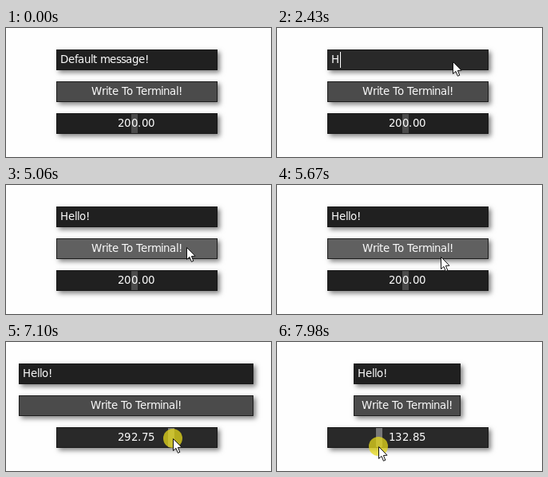
Write an HTML page with a canvas that moves like this. It is 332 px wide and 162 px high and loops after 8000 ms.

```html
<!DOCTYPE html>
<html lang="en">
<head>
<meta charset="utf-8">
<title>Widgets</title>
<style>
html, body { margin: 0; width: 332px; height: 162px; overflow: hidden; background: #fefefe; }
canvas { display: block; }
</style>
</head>
<body>
<canvas id="stage" width="332" height="162"></canvas>
<script>
const ctx = document.getElementById('stage').getContext('2d');
const LOOP = 8000;
const SIZE = 13.33;
const FAMILY = '"DejaVu Sans", sans-serif';

// Pointer moves: start, end, steps, x, y, slider value, ease
const linear = p => p;
const easeOut = p => 1 - (1 - p) ** 2.3;
const easeIn = p => p ** 1.3;
const smooth = p => p * p * (3 - 2 * p);
const start = { x: 306, y: 50, value: 200 };
const moves = [
  [330, 540, 4, 220, 42, 200, linear],
  [4170, 4380, 4, 210, 73, 200, easeOut],
  [4655, 4720, 2, 195, 76, 200, linear],
  [4990, 5060, 2, 226, 78, 200, linear],
  [5480, 6010, 8, 160, 115, 200, smooth],
  [6140, 6140, 1, 160, 115, 197, linear],
  [6340, 6480, 3, 164, 119, 205, easeIn],
  [6550, 7100, 9, 209, 121, 292.75, linear],
  [7170, 7370, 3, 217, 121, 312, easeOut],
  [7570, 7980, 7, 127, 131, 132.85, smooth]
];
const presses = [[680, 740], [4520, 4590], [5330, 5405], [6140, LOOP]];
const keys = [2430, 2630, 2700, 2840, 2970, 3520];

// Stepped progress: 1/n at t0, 1 at t1
function steps(t, t0, t1, n) {
  if (t < t0) return 0;
  if (t >= t1) return 1;
  return (Math.floor((t - t0) / (t1 - t0) * (n - 1)) + 1) / n;
}

function pointerAt(t) {
  let { x, y, value } = start;
  for (const [t0, t1, n, tx, ty, tv, ease] of moves) {
    if (t < t0) break;
    const p = ease(steps(t, t0, t1, n));
    x += (tx - x) * p;
    y += (ty - y) * p;
    value += (tv - value) * p;
  }
  return { x: Math.round(x), y: Math.round(y), value };
}

function messageAt(t) {
  if (t >= keys[0]) return 'Hello!'.slice(0, keys.filter(k => t >= k).length);
  const gone = (t >= 1340) + Math.round(15 * steps(t, 1540, 2020, 8));
  return 'Default message!'.slice(0, 16 - gone);
}

// Measured large, so that hinting does not alter the advances
const cache = {};
function measure(s) {
  if (!(s in cache)) {
    ctx.font = `${SIZE * 100}px ${FAMILY}`;
    cache[s] = ctx.measureText(s).width / 100;
  }
  return cache[s];
}

function layout(str, whole) {
  const xs = [];
  let x = 0;
  for (let i = 0; i < str.length; i++) {
    xs.push(x);
    const a = str[i], b = str[i + 1] || '';
    const w = measure(a);
    x += whole ? Math.floor(w) : w;
    if (whole && b) x += Math.trunc(measure(a + b) - w - measure(b));
  }
  return { xs, width: x };
}

function text(str, { xs }, x, y) {
  ctx.font = `${SIZE}px ${FAMILY}`;
  ctx.fillStyle = '#fafafa';
  xs.forEach((dx, i) => ctx.fillText(str[i], Math.round(x + dx), y));
}

function centered(str, mid, y, whole) {
  const line = layout(str, whole);
  text(str, line, Math.floor(mid - line.width / 2), y);
}

function rect(x, y, w, h, color) {
  ctx.fillStyle = color;
  ctx.fillRect(x, y, w, h);
}

function box(x, y, w, fill, border) {
  ctx.save();
  ctx.shadowColor = 'rgba(0,0,0,.5)';
  ctx.shadowBlur = 6;
  ctx.shadowOffsetX = ctx.shadowOffsetY = 3;
  rect(x, y, w, 26, border);
  ctx.restore();
  rect(x + 1, y + 1, w - 2, 24, fill);
}

function arrow(x, y) {
  ctx.save();
  ctx.translate(x, y);
  ctx.beginPath();
  ctx.moveTo(0.5, 0.5);
  ctx.lineTo(0.5, 15.5);
  ctx.lineTo(4, 12.4);
  ctx.lineTo(6.4, 18.3);
  ctx.lineTo(8.8, 17.3);
  ctx.lineTo(6.4, 11.5);
  ctx.lineTo(11, 11.2);
  ctx.closePath();
  ctx.fillStyle = '#fff';
  ctx.fill();
  ctx.strokeStyle = '#111';
  ctx.lineWidth = 1;
  ctx.stroke();
  ctx.restore();
}

function draw(t) {
  const { x, y, value } = pointerAt(t);
  const shown = t >= 330;
  const pressed = presses.some(([a, b]) => t >= a && t < b);
  const over = (top, bottom) => shown && x < 265 && y >= top && y < bottom;

  rect(0, 0, 332, 162, '#fefefe');

  const wide = value + 2;
  const left = Math.round(163.5 - wide / 2);
  const w = Math.floor(wide);

  // Text field
  box(left, 27, w, over(27, 60) ? '#292929' : '#202020', '#181818');
  const msg = messageAt(t);
  const line = layout(msg, true);
  text(msg, line, left + 5, 44);
  if (t >= 680 && t < 4520) rect(left + 6 + line.width, 30, 1, 20, '#fff');

  // Button
  const hot = over(67, 93);
  box(left, 67, w, hot ? (pressed ? '#757575' : '#606060') : '#4b4b4b', '#1c1c1c');
  centered('Write To Terminal!', left + w / 2, 84, true);

  // Slider
  const drag = t >= 6140;
  const active = drag || over(107, 133);
  box(63, 107, 202, active ? '#292929' : '#202020', '#181818');
  rect(Math.floor(64 + (value - 10) / 390 * 192), 108, 8, 24, drag ? '#787878' : active ? '#606060' : '#4b4b4b');
  centered(value.toFixed(2), 164, 124, false);

  if (pressed) {
    ctx.beginPath();
    ctx.arc(x, y, 12, 0, Math.PI * 2);
    ctx.fillStyle = 'rgba(230,216,27,.75)';
    ctx.fill();
  }
  if (shown) arrow(x, y);
}

function tick() {
  draw(performance.now() % LOOP);
  requestAnimationFrame(tick);
}
tick();
</script>
</body>
</html>
```
